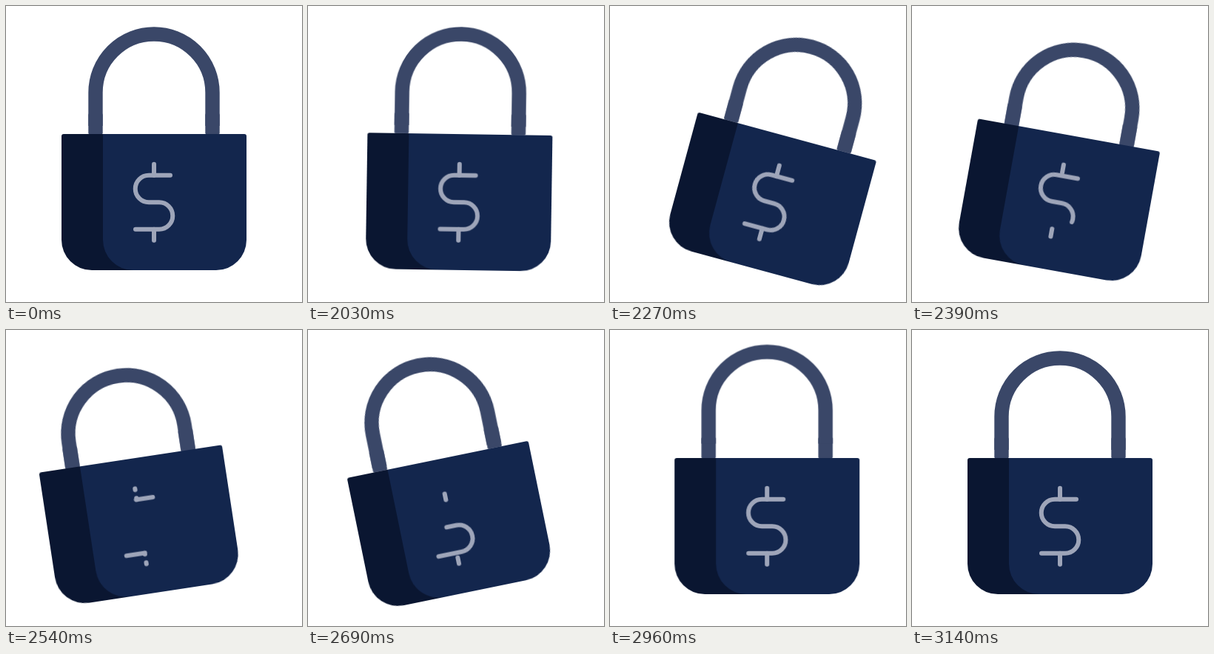
Recreate the animation shown at these times as an HTML page. Size 400 by 400 pixels, loop 3170 ms.

```html
<!DOCTYPE html>
<html lang="en">
<head>
<meta charset="utf-8">
<title>Padlock</title>
<style>
  html, body { margin: 0; width: 100%; height: 100%; overflow: hidden; background: #fff; }
  svg { display: block; width: 100%; height: 100%; }

  .slide, .tilt, .arch, .out path, .in path {
    animation: 3170ms cubic-bezier(.333, 0, .667, 1) infinite;
  }
  .slide { animation-name: slide; }
  .tilt { animation-name: tilt; transform-origin: 200px 265px; }
  .arch { animation-name: arch; }
  .out path { animation-name: erase; }
  .in path { animation-name: redraw; }

  .shackle { fill: #3a4768; }
  .arch { fill: none; stroke: #3a4768; stroke-width: 19.4; }
  .side { fill: #0a1631; }
  .front { fill: #13264d; }
  .sign { fill: none; stroke: #9ea5b9; stroke-width: 6; stroke-linecap: round; stroke-linejoin: round; }
  .sign path { stroke-dasharray: 100 200; }

  @keyframes slide {
    0%, 63.09% { transform: translateX(0); }
    67.19% { transform: translateX(28px); }
    80.13% { transform: translateX(-18px); }
    91.8% { transform: translateX(14px); }
    99.05%, 100% { transform: translateX(0); }
  }
  @keyframes tilt {
    0%, 63.09% { transform: rotate(0deg); }
    69.87%, 72.71% { transform: rotate(15.2deg); }
    83.28% { transform: rotate(-15deg); }
    88.49%, 100% { transform: rotate(0deg); }
  }
  @keyframes arch {
    0%, 65.93% { transform: translateY(0); }
    78.71% { transform: translateY(23px); }
    90.85% { transform: translateY(-11px); }
    99.05%, 100% { transform: translateY(0); }
  }
  /* The old stroke retreats to its start while a new one grows back from its end. */
  @keyframes erase {
    0%, 71.36% { stroke-dashoffset: 0; }
    82.71%, 100% { stroke-dashoffset: 101; }
  }
  @keyframes redraw {
    0%, 76.34% { stroke-dashoffset: -101; }
    92.43%, 100% { stroke-dashoffset: 0; }
  }
</style>
</head>
<body>
<svg viewBox="0 0 400 400">
  <defs>
    <g id="dollar">
      <path pathLength="100" d="M222 228.7H193a18.25 18.25 0 0 0 0 36.5H207a18.25 18.25 0 0 1 0 36.5H175"/>
      <path pathLength="100" d="M200 213.7V228.7"/>
      <path pathLength="100" d="M200 301.7V316.7"/>
    </g>
  </defs>
  <g class="slide">
    <g class="tilt">
      <rect class="shackle" x="111.3" y="145" width="19.4" height="28.5" rx="2"/>
      <rect class="shackle" x="269.3" y="145" width="19.4" height="28.5" rx="2"/>
      <path class="arch" d="M121 162V117a79 79 0 0 1 158 0V162"/>
      <path class="side" d="M78 173H200V357H116a41 41 0 0 1-41-41V176a3 3 0 0 1 3-3z"/>
      <path class="front" d="M131 173H322a3 3 0 0 1 3 3V316a41 41 0 0 1-41 41H172a41 41 0 0 1-41-41z"/>
      <g class="sign out">
        <path pathLength="100" d="M222 228.7H193a18.25 18.25 0 0 0 0 36.5H207a18.25 18.25 0 0 1 0 36.5H175"/>
        <path pathLength="100" d="M200 213.7V228.7"/>
        <path pathLength="100" d="M200 301.7V316.7"/>
      </g>
      <g class="sign in"><use href="#dollar"/></g>
    </g>
  </g>
</svg>
<script>
  // Inline the shared sign so that its paths take the group's animation.
  const use = document.querySelector('use');
  use.replaceWith(...document.getElementById('dollar').cloneNode(true).children);
</script>
</body>
</html>
```
